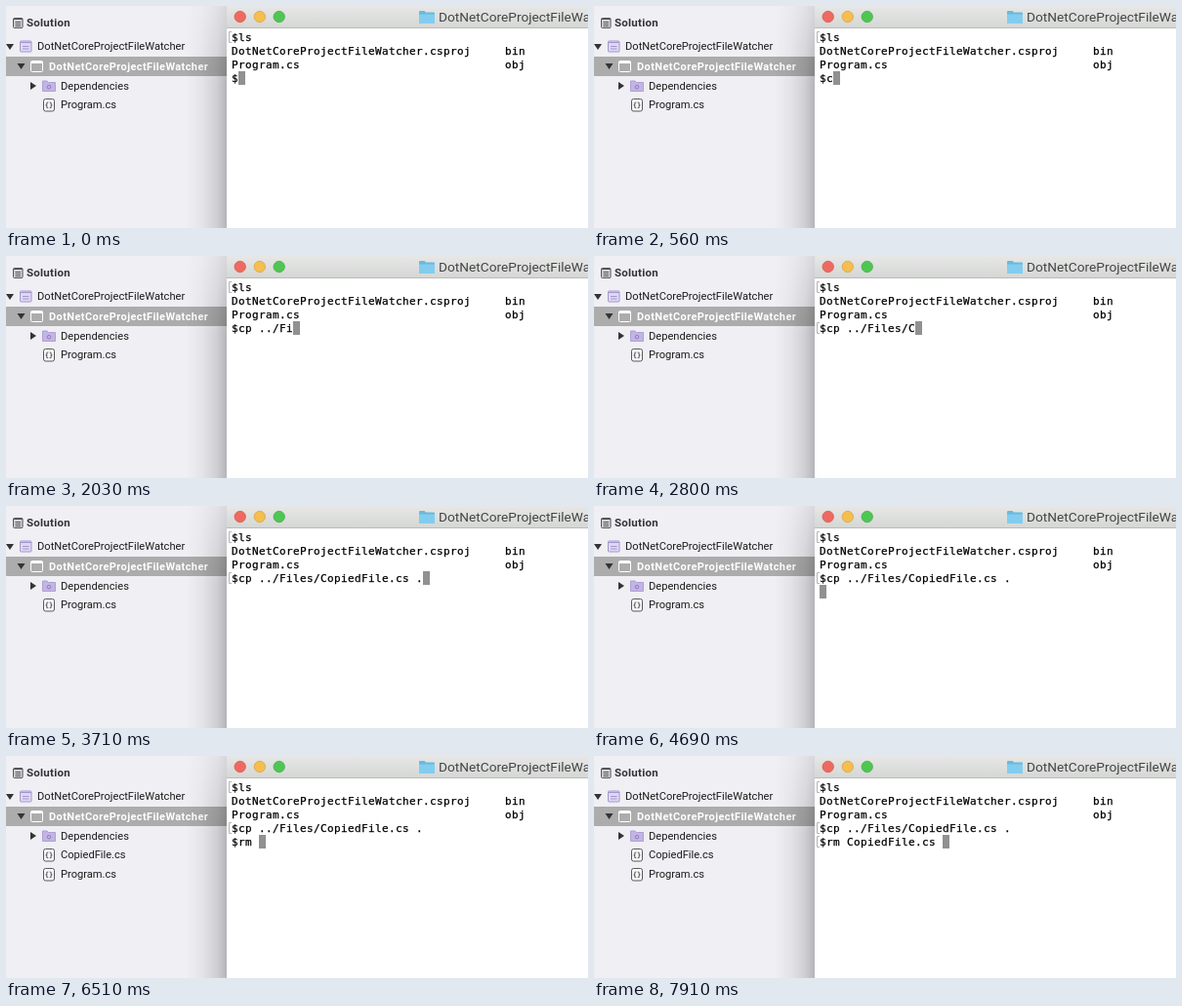
Write an HTML page that moves like this. It is 596 px wide and 228 px high and loops after 8 s.

```html
<!DOCTYPE html>
<html lang="en">
<head>
<meta charset="utf-8">
<title>Project tree follows the terminal</title>
<style>
  html, body { margin: 0; width: 100%; height: 100%; overflow: hidden; background: #efeff4; }
  svg { display: block; width: 596px; height: 228px; }
  .tree { font: 11.12px Roboto, Inter, sans-serif; fill: #1c1c1c; }
  .head { font-weight: 700; font-size: 11.5px; letter-spacing: .25px; fill: #333; }
  .picked { font-weight: 700; font-size: 11px; letter-spacing: .4px; fill: #fff; }
  .title { font: 13.7px Roboto, Inter, sans-serif; fill: #454545; }
  .term { font: 11px "DejaVu Sans Mono", "Liberation Mono", monospace; letter-spacing: .378px; fill: #000; stroke: #000; stroke-width: .25px; }
  .term text { white-space: pre; }
  .mark { fill: none; stroke: #b4b4b4; }
  .brace { font: 700 7px "DejaVu Sans Mono", monospace; fill: #444; text-anchor: middle; }
</style>
</head>
<body>
<svg viewBox="0 0 596 228">
  <defs>
    <linearGradient id="shade">
      <stop offset="0" stop-opacity="0"/>
      <stop offset=".4" stop-opacity=".045"/>
      <stop offset=".75" stop-opacity=".13"/>
      <stop offset="1" stop-opacity=".24"/>
    </linearGradient>
    <linearGradient id="fade" x2="0" y2="1">
      <stop offset="0" stop-color="#fff" stop-opacity=".4"/>
      <stop offset=".35" stop-color="#fff"/>
    </linearGradient>
    <mask id="fadeTop" maskUnits="userSpaceOnUse" x="184" y="0" width="42" height="228">
      <rect x="184" width="42" height="228" fill="url(#fade)"/>
    </mask>
    <linearGradient id="bar" x2="0" y2="1">
      <stop offset="0" stop-color="#e6e7e6"/>
      <stop offset="1" stop-color="#d5d7d5"/>
    </linearGradient>
    <g id="file">
      <rect x=".5" y=".5" width="11" height="12.500" rx="2" fill="#f7f7fa" stroke="#585858"/>
      <text class="brace" x="6" y="9.2">{}</text>
    </g>
    <path id="mark" class="mark" d="M231 .5H228.5V11.5H231"/>
  </defs>

  <!-- Solution pane -->
  <rect width="226" height="228" fill="#efeff4"/>
  <rect y="52" width="226" height="20" fill="#acacac"/>
  <g class="tree">
    <rect x="7.5" y="12.500" width="9.500" height="10" rx="1" fill="#d5d5d9" stroke="#555"/>
    <path d="M7.5 13.5H17M9.5 16.5H15M9.5 18.5H15M9.5 20.500H15" stroke="#555"/>
    <text class="head" x="21" y="21">Solution</text>

    <path d="M0 39H8L4 45Z" fill="#333"/>
    <rect x="14.5" y="36" width="11.500" height="11" rx="1" fill="#dfd8f0" stroke="#a497cf"/>
    <path d="M14.500 37.500H26M17 41.5H23.500M17 44H23.500" stroke="#a497cf"/>
    <text x="32" y="45.3">DotNetCoreProjectFileWatcher</text>

    <path d="M11.5 59H19.5L15.5 65Z" fill="#333"/>
    <rect x="25.5" y="56.5" width="12" height="11" rx="1" fill="none" stroke="#fff"/>
    <path d="M25.5 58H37.5" stroke="#fff" stroke-width="2"/>
    <text class="picked" x="44" y="66">DotNetCoreProjectFileWatcher</text>

    <path d="M25 78V86L31 82Z" fill="#333"/>
    <path d="M37.5 77H42L43.5 78.500H50.5V87.5H37.5Z" fill="#c3b5e2" stroke="#b09fd8"/>
    <circle cx="44" cy="83.2" r="1.800" fill="none" stroke="#8f7dc2"/>
    <text x="56" y="85.800">Dependencies</text>

    <g id="copied" visibility="hidden">
      <use href="#file" x="38" y="95"/>
      <text x="56" y="105.3">CopiedFile.cs</text>
    </g>
    <g id="program">
      <use href="#file" x="38" y="95"/>
      <text x="56" y="105.3">Program.cs</text>
    </g>
  </g>
  <rect x="184" width="42" height="228" fill="url(#shade)" mask="url(#fadeTop)"/>

  <!-- Terminal window -->
  <rect x="226" width="370" height="228" fill="#fff"/>
  <rect x="226" width="370" height="22" fill="url(#bar)"/>
  <rect x="226" y="22" width="370" height="1" fill="#b9bbb9"/>
  <g stroke-width=".8">
    <circle cx="239.7" cy="11" r="5.7" fill="#ee6a60" stroke="#d9594f"/>
    <circle cx="259.8" cy="11" r="5.7" fill="#f4be50" stroke="#dba545"/>
    <circle cx="279.7" cy="11" r="5.7" fill="#4fc653" stroke="#45ae47"/>
  </g>
  <path d="M423 6Q423 5 424 5H428.500L430 6.500H438Q439 6.500 439 7.500V17Q439 18 438 18H424Q423 18 423 17Z" fill="#69b9df"/>
  <path d="M423 8.500H439V17Q439 18 438 18H424Q423 18 423 17Z" fill="#82cdef"/>
  <text class="title" x="443" y="16">DotNetCoreProjectFileWatcher</text>

  <rect id="cursor" width="7" height="14" fill="#919191"/>
  <g class="term">
    <text x="231" y="36">$ls</text>
    <text x="231" y="50">DotNetCoreProjectFileWatcher.csproj     bin</text>
    <text x="231" y="64">Program.cs                              obj</text>
    <text id="copyLine" x="231" y="78"></text>
    <text id="removeLine" x="231" y="92"></text>
  </g>
  <use href="#mark" y="26"/>
  <use id="copyMark" href="#mark" y="68"/>
  <use id="removeMark" href="#mark" y="82"/>
</svg>
<script>
  const LOOP = 8000, CELL = 7, LEFT = 231;
  const ENTER = 4690, TREE_UPDATE = 4830;
  const $ = id => document.getElementById(id);

  // keys: [time in ms, characters shown]; jumps are tab completions
  const copy = {
    text: "$cp ../Files/CopiedFile.cs .", line: $("copyLine"), mark: $("copyMark"), tab: 2240,
    keys: [[0, 1], [560, 2], [700, 3], [910, 4], [1120, 5], [1330, 6], [1540, 7], [1820, 8],
           [2030, 9], [2240, 13], [2800, 14], [3010, 15], [3150, 27], [3710, 28]]
  };
  const remove = {
    text: "$rm CopiedFile.cs ", line: $("removeLine"), mark: $("removeMark"), tab: 7700,
    keys: [[4760, 1], [6160, 2], [6300, 3], [6510, 4], [6790, 5], [7000, 6], [7700, 18]]
  };

  const show = (el, on) => el.setAttribute("visibility", on ? "visible" : "hidden");

  function type(cmd, t) {
    let count = 0;
    for (const [at, n] of cmd.keys) if (t >= at) count = n;
    cmd.line.textContent = cmd.text.slice(0, count);
    show(cmd.mark, t >= cmd.tab);
    return count;
  }

  function draw(t) {
    const copied = type(copy, t), removed = type(remove, t);
    const entered = t >= ENTER;
    $("cursor").setAttribute("x", LEFT + CELL * (entered ? removed : copied));
    $("cursor").setAttribute("y", entered ? 81 : 67);

    const added = t >= TREE_UPDATE;
    show($("copied"), added);
    $("program").setAttribute("transform", `translate(0 ${added ? 20 : 0})`);
  }

  const start = performance.now();
  function tick() {
    draw((performance.now() - start) % LOOP);
    requestAnimationFrame(tick);
  }
  draw(0);
  requestAnimationFrame(tick);
</script>
</body>
</html>
```
